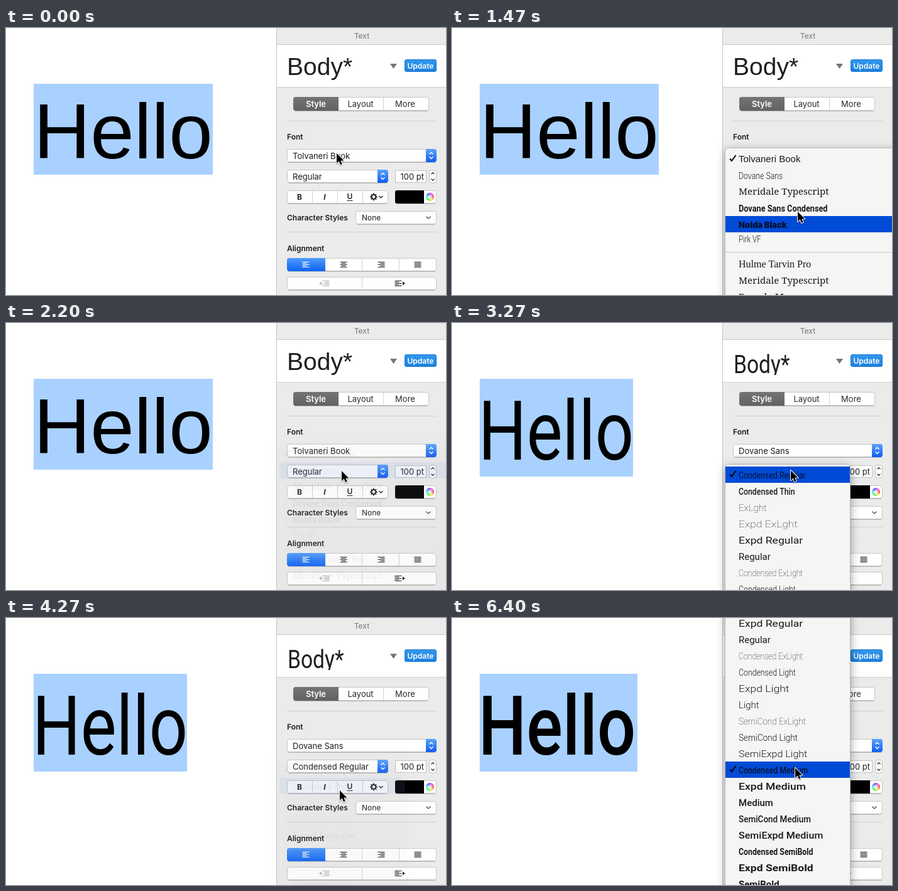
These frames come from a looping animation (700 by 426 pixels, 6470 ms). An HTML page with a canvas:

```html
<!DOCTYPE html>
<html lang="en">
<head>
<meta charset="utf-8">
<title>Choosing a font style</title>
<style>
  html, body { margin: 0; width: 100%; height: 100%; overflow: hidden; background: #fff; }
  canvas { display: block; width: 700px; height: 426px; }
</style>
</head>
<body>
<canvas id="stage"></canvas>
<script>
const W = 700, H = 426, LOOP = 6470, STEP = 200 / 3;
const canvas = document.getElementById('stage');
const ctx = canvas.getContext('2d');
const dpr = window.devicePixelRatio || 1;
canvas.width = W * dpr;
canvas.height = H * dpr;

const UI = 'Inter, sans-serif';
const GROTESK = '"Liberation Sans", Arial, sans-serif';
const FAMILY = 'Roboto, sans-serif';
const SLAB = '"Noto Serif", serif';
const BLUE = '#004bd6';
const COND = 0.82;

const fontMenu = [
  { name: 'Tolvaneri Book', y: 196, base: 214, font: `15px ${GROTESK}` },
  { name: 'Dovane Sans', y: 222, base: 241, font: `300 15px ${FAMILY}`, wide: COND },
  { name: 'Meridale Typescript', y: 248, base: 266, font: `15px ${SLAB}` },
  { name: 'Dovane Sans Condensed', y: 274, base: 293, font: `700 15.5px ${FAMILY}`, wide: COND },
  { name: 'Nolda Black', y: 300, base: 319, font: `900 13px ${UI}` },
  { name: 'Pirk VF', y: 326, base: 342, font: `300 14px ${FAMILY}`, wide: COND },
  { name: 'Hulme Tarvin Pro', y: 364, base: 382, font: '16px "Liberation Serif", serif' },
  { name: 'Meridale Typescript', y: 390, base: 408, font: `15px ${SLAB}` },
  { name: 'Brundo Mono', y: 416, base: 434, font: `15px ${SLAB}` }
];

const styleNames = [
  'Condensed Regular', 'Condensed Thin', 'ExLght', 'Expd ExLght', 'Expd Regular',
  'Regular', 'Condensed ExLight', 'Condensed Light', 'Expd Light', 'Light',
  'SemiCond ExLight', 'SemiCond Light', 'SemiExpd Light', 'Condensed Medium',
  'Expd Medium', 'Medium', 'SemiCond Medium', 'SemiExpd Medium',
  'Condensed SemiBold', 'Expd SemiBold', 'SemiBold'
];
const widths = { Condensed: COND, SemiCond: 0.9, SemiExpd: 1.07, Expd: 1.17 };
const weights = { ExLght: 200, ExLight: 200, Light: 300, Regular: 400, Thin: 500, Medium: 500, SemiBold: 700 };

// One width and one weight per style word
function styleMenu(selected) {
  return styleNames.map((name, i) => {
    const words = name.split(' ');
    const y = 229 + 26 * (i - selected);
    return {
      name, y, base: y + 19,
      font: `${weights[words[words.length - 1]]} 15px ${FAMILY}`,
      wide: widths[words[0]] || 1
    };
  });
}

// Pointer path: time, x, y
const path = [
  [0, 526, 200], [330, 527, 201], [530, 531, 207], [860, 546, 237], [930, 547, 246],
  [1130, 554, 345], [1200, 555, 350], [1330, 553, 322], [1400, 552, 306], [1466, 550, 293],
  [1730, 541, 243], [1930, 536, 237], [2200, 534, 236], [2800, 539, 236], [3400, 539, 235],
  [3700, 535, 256], [3930, 531, 274], [4270, 531, 275], [4470, 532, 272], [5000, 538, 247],
  [5330, 541, 241], [5700, 541, 242], [6070, 543, 246], [6400, 546, 239], [6470, 546, 239]
];

function pointer(t) {
  const i = Math.max(1, path.findIndex(p => p[0] >= t));
  const [a, b] = [path[i - 1], path[i]];
  const k = Math.max(0, (t - a[0]) / (b[0] - a[0]));
  const e = k * k * (3 - 2 * k);
  return { x: a[1] + (b[1] - a[1]) * e, y: a[2] + (b[2] - a[2]) * e };
}

function text(str, x, y, font, color = '#1c1c1c', align = 'left', wide = 1) {
  ctx.save();
  ctx.translate(x, y);
  ctx.scale(wide, 1);
  ctx.font = font;
  ctx.fillStyle = color;
  ctx.textAlign = align;
  ctx.fillText(str, 0, 0);
  ctx.restore();
}

function rect(x, y, w, h, color) {
  ctx.fillStyle = color;
  ctx.fillRect(x, y, w, h);
}

function box(x, y, w, h, r, fill, stroke) {
  ctx.beginPath();
  ctx.roundRect(x, y, w, h, r);
  ctx.fillStyle = fill;
  ctx.fill();
  if (stroke) {
    ctx.strokeStyle = stroke;
    ctx.lineWidth = 1;
    ctx.stroke();
  }
}

function line(points, color, width = 1) {
  ctx.beginPath();
  points.forEach(([x, y]) => ctx.lineTo(x, y));
  ctx.strokeStyle = color;
  ctx.lineWidth = width;
  ctx.stroke();
}

function shade(y, h, top, bottom) {
  const g = ctx.createLinearGradient(0, y, 0, y + h);
  g.addColorStop(0, top);
  g.addColorStop(1, bottom);
  return g;
}

function control(x, y, w, h) {
  rect(x + 2, y + h, w - 4, 1, '#b4b4b4');
  box(x + 0.5, y + 0.5, w - 1, h - 1, 3.5, '#fff', '#c6c6c6');
}

// dir 1 points down, -1 points up
function chevron(x, y, s, dir, color, width) {
  line([[x - s, y - s * dir / 2], [x, y + s * dir / 2], [x + s, y - s * dir / 2]], color, width);
}

function popup(x, y, w, label) {
  control(x, y, w, 21);
  box(x + w - 17, y, 17, 21, [0, 4, 4, 0], shade(y, 21, '#5ba3fb', '#0f5cf2'));
  const cx = x + w - 8.5;
  chevron(cx, y + 7, 3, -1, '#fff', 1.5);
  chevron(cx, y + 14, 3, 1, '#fff', 1.5);
  text(label, x + 9, y + 16, `13px ${UI}`);
}

function lines(cx, y, align, color) {
  for (let i = 0; i < 5; i++) {
    const w = align === 'full' || i % 2 === 0 ? 11 : 7;
    const x = align === 'center' ? cx - w / 2 : align === 'right' ? cx + 5.5 - w : cx - 5.5;
    rect(x, y + i * 2, w, 1, color);
  }
}

function arrow(x, y, dir, color) {
  ctx.beginPath();
  ctx.moveTo(x, y - 3);
  ctx.lineTo(x + 4 * dir, y);
  ctx.lineTo(x, y + 3);
  ctx.fillStyle = color;
  ctx.fill();
}

function gear(x, y) {
  for (let i = 0; i < 8; i++) {
    const a = i * Math.PI / 4, c = Math.cos(a), s = Math.sin(a);
    line([[x + 3 * c, y + 3 * s], [x + 6 * c, y + 6 * s]], '#222', 1.7);
  }
  ctx.beginPath();
  ctx.arc(x, y, 3.4, 0, 7);
  ctx.lineWidth = 2;
  ctx.stroke();
}

function wheel(x, y, r) {
  const hues = ctx.createConicGradient(0, x, y);
  for (let i = 0; i <= 6; i++) hues.addColorStop(i / 6, `hsl(${i * 60}, 85%, 58%)`);
  const glow = ctx.createRadialGradient(x, y, 0, x, y, r);
  glow.addColorStop(0, '#fff');
  glow.addColorStop(1, 'rgba(255,255,255,0)');
  for (const fill of [hues, glow]) {
    ctx.beginPath();
    ctx.arc(x, y, r, 0, 7);
    ctx.fillStyle = fill;
    ctx.fill();
  }
}

function page(look) {
  rect(0, 0, W, H, '#fff');
  if (look === 0) {
    rect(44, 89, 285, 145, '#a9d1ff');
    text('Hello', 44, 208, `125px ${GROTESK}`, '#000');
  } else {
    rect(44, 89, look === 1 ? 244 : 251, 156, '#a9d1ff');
    text('Hello', 42, 218, `${look === 1 ? 400 : 500} 131px ${FAMILY}`, '#000', 'left', COND);
  }
}

function panel(look) {
  rect(430, 0, 270, H, '#ebebeb');
  rect(431, 27, 269, 67, '#fff');
  rect(430, 26, 270, 1, '#cbcbcb');
  rect(430, 94, 270, 1, '#cfcfcf');
  rect(430, 0, 1, H, '#c3c3c3');
  text('Text', 566, 17, `500 12px ${UI}`, '#868686', 'center');

  ctx.save();
  ctx.beginPath();
  ctx.rect(431, 27, 180, look ? 56 : 67);
  ctx.clip();
  if (look === 0) text('Body*', 447, 75, `39px ${GROTESK}`, '#1f1f1f');
  else text('Body*', 448, 80, `${look === 1 ? 400 : 500} 41px ${FAMILY}`, '#1f1f1f', 'left', COND);
  ctx.restore();

  ctx.beginPath();
  ctx.moveTo(611, 57);
  ctx.lineTo(622, 57);
  ctx.lineTo(616.5, 65);
  ctx.fillStyle = '#757575';
  ctx.fill();
  box(634.5, 50.5, 50, 19, 2.5, shade(50, 20, '#3499ee', '#1a7fdd'), '#1b78ce');
  text('Update', 659.5, 64.5, `600 12px ${UI}`, '#fff', 'center');

  control(457, 110, 216, 22);
  box(457, 110, 72, 22, [4, 0, 0, 4], shade(110, 22, '#747474', '#626262'));
  rect(600, 111, 1, 20, '#d2d2d2');
  text('Style', 493, 126, `600 13px ${UI}`, '#fff', 'center');
  text('Layout', 564, 126, `13px ${UI}`, '#2a2a2a', 'center');
  text('More', 635, 126, `13px ${UI}`, '#2a2a2a', 'center');

  const label = `600 12px ${UI}`;
  rect(447, 148, 238, 1, '#cfcfcf');
  text('Font', 447, 178, label);
  popup(447, 193, 238, look ? 'Dovane Sans' : 'Tolvaneri Book');
  popup(447, 226, 161, ['Regular', 'Condensed Regular', 'Condensed Medium'][look]);
  box(619.5, 227.5, 49, 19, 0, '#fff', '#c0c0c0');
  text('100 pt', 665, 242, `13px ${UI}`, '#1c1c1c', 'right');
  box(673.5, 226.5, 11, 21, 4, '#fff', '#bdbdbd');
  chevron(679, 232, 2.5, -1, '#333', 1.3);
  chevron(679, 242, 2.5, 1, '#333', 1.3);

  control(447, 259, 161, 21);
  [487, 527, 567].forEach(x => rect(x, 260, 1, 19, '#d0d0d0'));
  text('B', 467, 274, `700 12px ${UI}`, '#222', 'center');
  text('I', 507, 274, `italic 700 12px ${UI}`, '#222', 'center');
  text('U', 547, 273, `600 12px ${UI}`, '#222', 'center');
  rect(542.5, 275, 9, 1, '#222');
  gear(585, 269.5);
  chevron(596.5, 269.5, 3, 1, '#222', 1.3);
  control(619, 259, 66, 21);
  box(619, 259, 46, 21, [3, 0, 0, 3], '#000');
  wheel(674.5, 269.5, 6.5);

  text('Character Styles', 447, 307, label);
  control(556, 292, 129, 21);
  text('None', 566, 307, `12px ${UI}`);
  chevron(672, 302.5, 3.5, 1, '#444', 1.2);
  rect(447, 325, 238, 1, '#cfcfcf');

  text('Alignment', 447, 356, label);
  control(447, 367, 238, 21);
  box(447, 367, 61, 21, [4, 0, 0, 4], shade(367, 21, '#4f9bfa', '#0d63f5'));
  [566, 625].forEach(x => rect(x, 368, 1, 19, '#d0d0d0'));
  lines(477, 373, 'left', '#fff');
  lines(537, 373, 'center', '#222');
  lines(597, 373, 'right', '#222');
  lines(655, 373, 'full', '#222');
  control(447, 397, 238, 21);
  rect(566, 398, 1, 19, '#d0d0d0');
  lines(509, 403, 'right', '#b5b5b5');
  arrow(502, 407.5, -1, '#b5b5b5');
  lines(624, 403, 'left', '#222');
  arrow(631, 407.5, 1, '#222');
}

function check(y) {
  line([[442, y + 13.5], [445, y + 17], [451.5, y + 8]], '#000', 2);
}

function menu(rows, top, width, hotY, checked, alpha) {
  ctx.save();
  ctx.globalAlpha = alpha;
  ctx.shadowColor = 'rgba(0,0,0,.38)';
  ctx.shadowBlur = 14 * dpr;
  ctx.shadowOffsetY = 4 * dpr;
  box(435, top, width, H + 40 - top, 5, '#f5f5f5');
  ctx.shadowColor = 'transparent';
  box(434.5, top + 0.5, width, H + 40 - top, 5, 'transparent', '#b9b9b9');
  if (rows === fontMenu) rect(435, 357, width, 2, '#dcdcdc');
  rows.forEach((row, i) => {
    const next = i + 1 < rows.length ? Math.min(rows[i + 1].y, row.y + 26) : row.y + 26;
    const hot = hotY >= row.y && hotY < next;
    if (hot) rect(435, row.y, width - 1, next - row.y, BLUE);
    text(row.name, 456, row.base, row.font, hot ? '#06102c' : '#1a1a1a', 'left', row.wide);
    if (i === checked) check(row.y - 1);
  });
  ctx.restore();
}

function drawPointer({ x, y }) {
  ctx.save();
  ctx.translate(x, y);
  ctx.beginPath();
  [[0, 0], [0, 16], [3.7, 12.6], [6, 18], [8.7, 17], [6.4, 11.7], [11.3, 11.6]]
    .forEach(([px, py]) => ctx.lineTo(px, py));
  ctx.closePath();
  ctx.shadowColor = 'rgba(0,0,0,.35)';
  ctx.shadowBlur = 2 * dpr;
  ctx.shadowOffsetY = dpr;
  ctx.strokeStyle = '#fff';
  ctx.lineWidth = 2;
  ctx.lineJoin = 'round';
  ctx.stroke();
  ctx.shadowColor = 'transparent';
  ctx.fillStyle = '#000';
  ctx.fill();
  ctx.restore();
}

// Opaque from open, then a quick fade that begins at shut
function opacity(t, open, shut) {
  if (t < open) return 0;
  const left = 1 - Math.max(0, t - shut) / 240;
  return left > 0 ? Math.pow(left, 1.5) : 0;
}

const firstStyles = styleMenu(0), laterStyles = styleMenu(13);

function draw(time) {
  const t = Math.min(96, Math.floor((time + 4) / STEP)) * STEP;
  const look = t < 2395 ? 0 : t < 4460 ? 1 : 2;
  const hotY = pointer(Math.max(0, t - STEP)).y;
  ctx.setTransform(dpr, 0, 0, dpr, 0, 0);
  page(look);
  panel(look);

  const fonts = opacity(t, 330, 1995);
  const first = opacity(t, 2930, 4060);
  const later = opacity(t, 5590, LOOP);
  if (fonts) menu(fontMenu, 191, 290, hotY, 0, fonts);
  if (first) menu(firstStyles, 225, 199, hotY, 0, first);
  if (later) menu(laterStyles, -30, 199, hotY, 13, later);
  drawPointer(pointer(t));
}

const start = performance.now();
function tick() {
  draw((performance.now() - start) % LOOP);
  requestAnimationFrame(tick);
}
tick();
</script>
</body>
</html>
```
